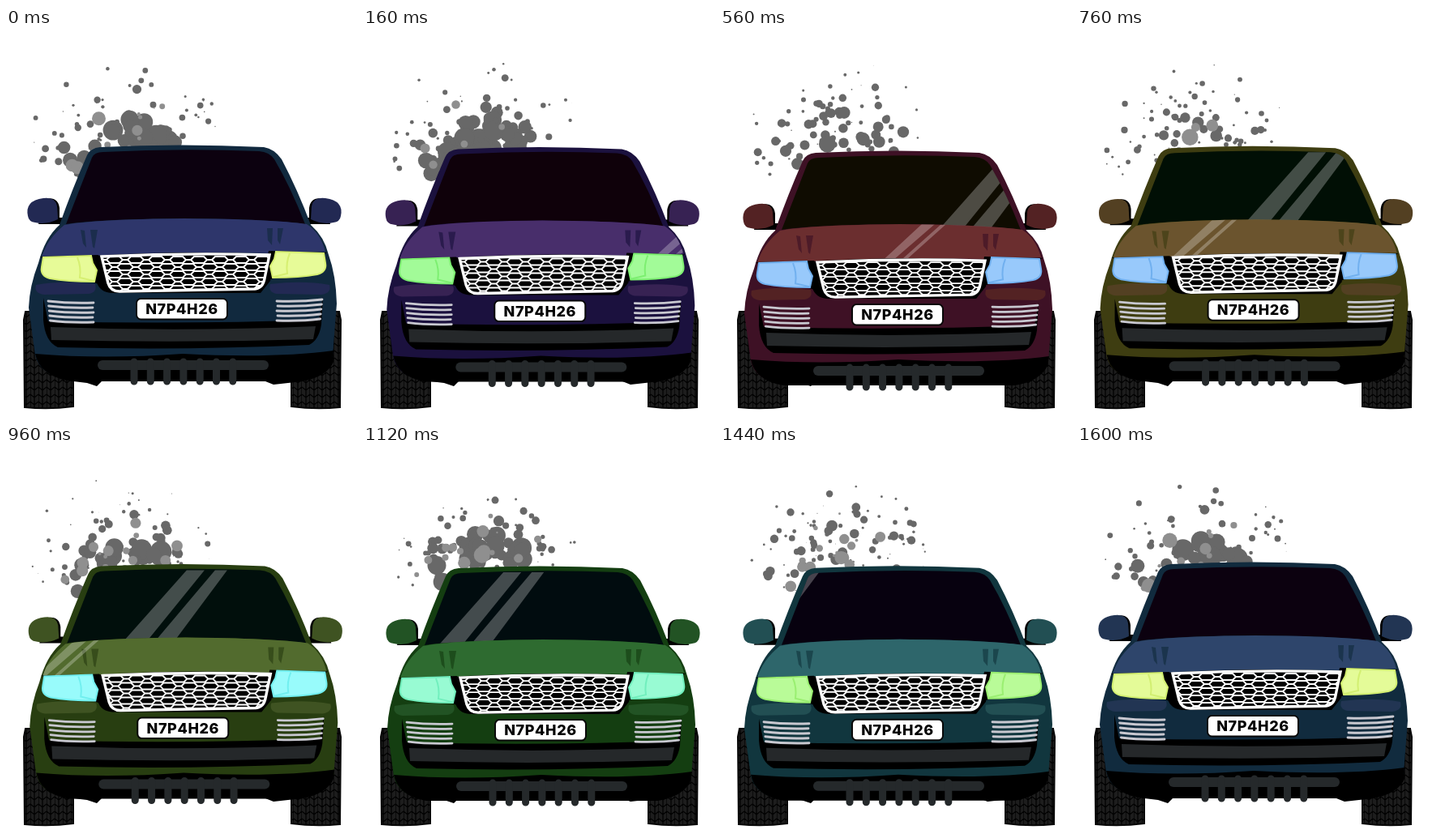
Write an HTML page that moves like this. It is 433x480 px and loops after 1.64 s.

```html
<!DOCTYPE html>
<html lang="en">
<head>
<meta charset="utf-8">
<title>Car with smoke</title>
<style>
html, body { margin: 0; width: 100%; height: 100%; overflow: hidden; background: #fff; }
svg { display: block; width: 100vw; height: 100vh; }
.body { fill: var(--body); }
.hood { fill: var(--hood); }
.trim { fill: var(--trim); }
.glass { fill: var(--glass); }
.crease { fill: var(--body); opacity: .65; }
.lamp { fill: var(--lamp); stroke: var(--rim); stroke-width: 2; }
.bar { fill: #25282a; }
.slot { stroke: #25292b; stroke-linecap: round; fill: none; }
.shine { fill: #fff; opacity: .26; }
.plate { font: 800 18px Inter, "DejaVu Sans", sans-serif; letter-spacing: .6px; text-anchor: middle; }
</style>
</head>
<body>
<svg id="stage" viewBox="0 0 433 480">
  <defs>
    <pattern id="tread" width="10" height="9" patternUnits="userSpaceOnUse">
      <rect width="10" height="9" fill="#1d1d1d"/>
      <path d="M0 0V9M5 0V9M0 2L5 6L10 2" fill="none" stroke="#000" stroke-width="1.3"/>
    </pattern>
    <path id="glassShape" d="M106 160Q109 153 120 153Q215 148 312 152Q325 153 331 162Q351 196 369 242Q330 236 220 235Q112 236 74 242Z"/>
    <path id="hoodShape" d="M72 243Q110 236 220 235Q330 236 371 242Q388 253 394 276L328 278Q220 275 114 281L44 283Q50 261 72 243Z"/>
    <path id="grilleShape" d="M118 282Q220 277 325 280L319 309Q317 321 307 322L140 325Q129 325 126 315Z"/>
    <clipPath id="glassClip"><use href="#glassShape"/></clipPath>
    <clipPath id="hoodClip"><use href="#hoodShape"/></clipPath>
    <clipPath id="grilleClip"><use href="#grilleShape"/></clipPath>
    <g id="mirror">
      <path d="M48 211Q64 207 66 222L66 234L74 234L72 242L40 242Z"/>
      <path class="trim" d="M27 232Q23 213 46 210Q61 208 63 220L64 236Q50 243 36 240Q28 239 27 232Z"/>
    </g>
    <g id="lamp">
      <path d="M42 282L114 280L121 318L108 314Z"/>
      <path class="lamp" d="M46 283L105 281L107 290L112 299L109 313Q75 313 54 309Q42 306 44 295Z"/>
      <path class="lamp" d="M88 283Q93 295 91 308L108 312" style="fill:none"/>
    </g>
    <path id="flare" class="trim" d="M37 317Q70 311 110 316Q113 326 102 328L47 329Q34 327 37 317Z"/>
    <g id="vent" fill="none" stroke="#c8c8d0" stroke-width="2.8" stroke-linecap="round"></g>
    <path id="tire" d="M24 350H82L83 440V467Q53 471 23 468L22 360Z" fill="url(#tread)" stroke="#080808" stroke-width="2"/>
  </defs>
  <rect width="433" height="480" fill="#fff"/>
  <g id="smoke"></g>
  <use href="#tire"/>
  <use href="#tire" transform="translate(435 0) scale(-1 1)"/>
  <path d="M36 396H404V412Q396 430 366 436L330 440L320 436H118L112 442L100 438L75 435Q40 428 36 396Z"/>
  <g id="car">
    <use href="#mirror"/>
    <use href="#mirror" transform="translate(440 0) scale(-1 1)"/>
    <path class="body" d="M66 243Q82 198 100 157Q104 148 116 147Q215 142 318 147Q331 149 340 162Q360 200 376 243Q393 258 398 280Q407 305 408 340L403 404Q395 428 362 432H75Q42 428 36 404L28 345Q29 318 40 290Q48 259 66 243Z"/>
    <use href="#glassShape" class="glass"/>
    <use href="#hoodShape" class="hood"/>
    <path class="crease" d="M92 249L97 250L99 271L95 266ZM104 249L113 249L109 272L107 270ZM322 247L329 247L328 268L323 262ZM335 247L342 247L338 267L335 262Z"/>
    <g clip-path="url(#glassClip)"><g id="glassShine" class="shine"><path d="M0 242L80 152H102L29 242ZM39 242L115 152H130L63 242Z"/></g></g>
    <g clip-path="url(#hoodClip)"><g id="hoodShine" class="shine"><path d="M0 285L54 235H70L12 285ZM22 285L78 235H84L28 285Z"/></g></g>
    <path d="M111 281Q220 274 329 279L326 312L314 327H130Q116 326 112 314Z"/>
    <use href="#lamp"/>
    <use href="#lamp" transform="translate(438 -5) scale(-1 1)"/>
    <g clip-path="url(#grilleClip)"><path id="mesh" fill="none" stroke="#fff" stroke-width="1.9"/></g>
    <use href="#grilleShape" fill="none" stroke="#fff" stroke-width="3.4"/>
    <use href="#flare"/>
    <use href="#flare" transform="translate(436 0) scale(-1 1)"/>
    <path d="M46 333L52 362Q220 366 386 360L391 331L389 366Q386 385 374 391Q220 398 64 394Q48 387 46 360Z"/>
    <path class="bar" d="M55 369Q220 375 382 368L379 384Q220 389 56 385Z"/>
    <use href="#vent"/>
    <use href="#vent" transform="translate(442 -2) scale(-1 1)"/>
    <path d="M36 402Q120 409 218 402Q330 408 404 398L402 410Q392 429 362 434H76Q41 428 36 402Z"/>
    <path class="slot" d="M119 416H318" stroke-width="12"/>
    <path id="pegs" class="slot" stroke-width="9"/>
    <rect x="161" y="334" width="112" height="25.5" rx="5.5" fill="#fff" stroke="#080808" stroke-width="2"/>
    <text class="plate" x="217" y="353">N7P4H26</text>
  </g>
</svg>
<script>
const LOOP = 1640, STEP = 40;
const el = id => document.getElementById(id);
const stage = el("stage"), car = el("car"), smoke = el("smoke");
const NS = "http://www.w3.org/2000/svg";

// Fixed repeated parts
let mesh = "", pegs = "", vents = "";
for (let row = 0; row < 5; row++) {
  for (let x = 108 + row % 2 * 13; x < 345; x += 26) {
    const y = 286 + row * 9;
    mesh += `M${x - 10} ${y}l4 -4h12l4 4l-4 4h-12zM${x + 10} ${y}h6`;
  }
}
for (let i = 0; i < 7; i++) pegs += `M${158 + i * 20.3} 412V436`;
for (let i = 0; i < 5; i++) {
  const y = 337 + i * 6;
  vents += `<path d="M${52 + i * .6} ${y}Q78 ${y + 3} ${108 - i % 2} ${y + 2}"/>`;
}
el("mesh").setAttribute("d", mesh);
el("pegs").setAttribute("d", pegs);
el("vent").innerHTML = vents;

// Hue tracks
const times = [0, 320, 560, 760, 1120, 1320, 1600];
const hues = {
  body: [208, 299, 333, 418, 475, 539, 566],
  hood: [232, 300, 359, 397, 482, 161 + 360, 577],
  glass: [290, 350, 410, 500, 550, 610, 650],
  lamp: [72, 156, 210, 210, 156, 120, 74]
};
function track(values, t) {
  let i = 0;
  while (i < times.length - 2 && t > times[i + 1]) i++;
  const k = Math.min(1, (t - times[i]) / (times[i + 1] - times[i]));
  return values[i] + (values[i + 1] - values[i]) * k;
}

// Smoke puffs: born at the roof, spreading and shrinking
let seed = 73;
function rnd() {
  seed = (seed * 16807) % 2147483647;
  return seed / 2147483647;
}
const between = (a, b) => a + (b - a) * rnd();

function puff(kind) {
  const x = between(84, 212);
  const y = x < 104 ? 152 + (104 - x) * 1.7 : between(128, 152);
  const angle = between(-.15, Math.PI + .3);
  const far = kind === "speck" ? between(.5, 1) : between(.05, .55);
  const p = {
    x, y, far,
    endX: 148 + Math.cos(angle) * 128,
    endY: 150 - Math.sin(angle) * 112,
    node: document.createElementNS(NS, "circle")
  };
  if (kind === "speck") {
    p.birth = between(0, LOOP);
    p.life = between(700, 1000);
    p.size = between(3, 8.5);
  } else if (kind === "cloud") {
    p.birth = rnd() < .7 ? between(-260, 330) : between(830, 1000);
    p.life = between(480, 580);
    p.size = between(9, 17);
  } else {
    p.birth = between(660, 1560);
    p.life = between(420, 560);
    p.size = between(6, 12);
  }
  p.node.setAttribute("fill", kind === "light" ? "#8f8f8f" : "#686868");
  smoke.append(p.node);
  return p;
}
const puffs = [["speck", 130], ["cloud", 100], ["light", 34]]
  .flatMap(([kind, n]) => Array.from({ length: n }, () => puff(kind)));

function drawPuff(p, t) {
  const age = ((t - p.birth + LOOP) % LOOP) / p.life;
  if (age >= 1) {
    p.node.setAttribute("r", 0);
    return;
  }
  const k = (1 - (1 - age) ** 2) * p.far;
  p.node.setAttribute("cx", (p.x + (p.endX - p.x) * k).toFixed(1));
  p.node.setAttribute("cy", (p.y + (p.endY - p.y) * k).toFixed(1));
  p.node.setAttribute("r", (p.size * Math.min(1, age * 6) * (1 - age) ** .7).toFixed(2));
}

function draw(t) {
  const hue = name => track(hues[name], t) % 360;
  const paint = (name, h, s, l) => stage.style.setProperty("--" + name, `hsl(${h} ${s}% ${l}%)`);
  paint("body", hue("body"), 58, 15.5);
  paint("hood", hue("hood"), 40, 30);
  paint("trim", hue("hood"), 42, 23);
  paint("glass", hue("glass"), 90, 3);
  paint("lamp", hue("lamp"), 92, 79);
  paint("rim", hue("lamp"), 80, 69);

  // Suspension: slow sink, quicker return
  const u = t % 800;
  const sink = u < 520 ? u / 520 * 8.3 : (800 - u) / 280 * 8.3;
  car.setAttribute("transform", `translate(${Math.min(2, sink * .5)} ${sink})`);

  el("glassShine").setAttribute("transform", `translate(${444 - t * .315} 0)`);
  el("hoodShine").setAttribute("transform", `translate(${417 - t * .4} 0)`);
  puffs.forEach(p => drawPuff(p, t));
}

const start = performance.now();
function tick() {
  const t = (performance.now() - start) % LOOP;
  draw(Math.floor(t / STEP) * STEP);
  requestAnimationFrame(tick);
}
tick();
</script>
</body>
</html>
```
